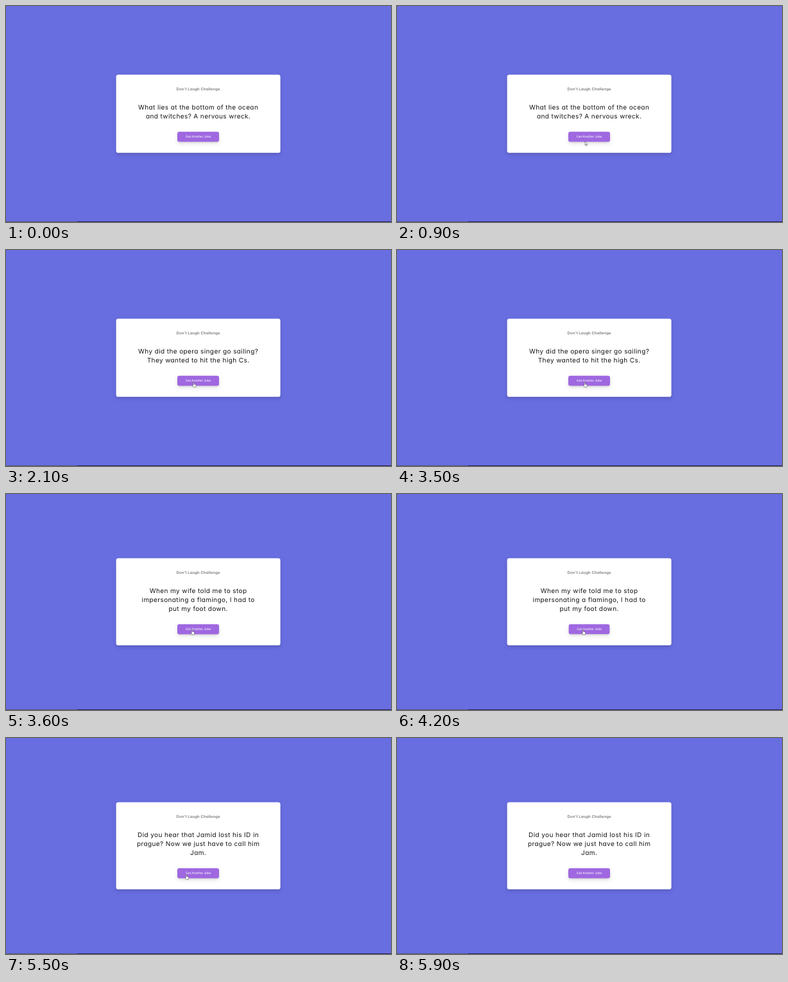
An HTML page for the animation above (6800 ms loop, 600 by 338 pixels).

```html
<!DOCTYPE html>
<html lang="en">
<head>
<meta charset="utf-8">
<title>Don't Laugh Challenge</title>
<style>
  html, body { margin: 0; width: 100%; height: 100%; overflow: hidden; background: #686de0; }
  svg { display: block; width: 600px; height: 338px; }
  text { text-anchor: middle; text-rendering: geometricPrecision; }
  #card { font-family: Inter, "Open Sans", sans-serif; font-feature-settings: "cv11"; }
  .raised { filter: drop-shadow(0 3.2px 3.2px rgba(0,0,0,.1)) drop-shadow(0 1.9px 1px rgba(0,0,0,.1)); }
  #title { font-size: 6px; font-weight: 600; letter-spacing: .08px; fill: #7c7c7c; }
  #joke { font-size: 10px; letter-spacing: .4px; fill: #151515; }
  #btn { transform-box: fill-box; transform-origin: center; }
  #btn text { font: 5.12px "Liberation Sans", Arial, sans-serif; fill: #fff; }
  #cursor path { fill: #fff; stroke: #333; stroke-width: .5; stroke-linejoin: round; }
</style>
</head>
<body>
<svg viewBox="0 0 600 338">
  <path d="M0 337H111V338H0Z" fill="#55586f"/>
  <path d="M111 337H600V338H111Z" fill="#23244a"/>
  <g id="card">
    <rect id="panel" class="raised" width="256" rx="3.4" fill="#fff"/>
    <text id="title" x="128" y="24.3">Don't Laugh Challenge</text>
    <text id="joke"></text>
    <g id="foot">
      <g id="btn">
        <rect class="raised" x="95.4" width="65" height="15.8" rx="3.2" fill="#9f68e0"/>
        <text x="128" y="9.7">Get Another Joke</text>
      </g>
    </g>
  </g>
  <g id="cursor">
    <path id="arrow" d="M0 0V6L1.4 4.8 2.3 6.8 3.2 6.4 2.3 4.5H4.1Z"/>
    <path id="hand" d="M-.7 .4Q0-.5 .7 .4V3L3.2 3.6Q4 3.9 3.8 4.9L3.2 7.8H-.2L-1.9 5.2Q-1.9 4.2-.7 4.9Z"/>
  </g>
</svg>
<script>
const LOOP = 6800, STEP = 100;
const $ = id => document.getElementById(id);
const move = (id, x, y) => $(id).setAttribute('transform', `translate(${x} ${y})`);
const show = (id, on) => $(id).style.display = on ? 'inline' : 'none';

const jokes = [
  [0, 'What lies at the bottom of the ocean\nand twitches? A nervous wreck.'],
  [2100, 'Why did the opera singer go sailing?\nThey wanted to hit the high Cs.'],
  [3600, 'When my wife told me to stop\nimpersonating a flamingo, I had to\nput my foot down.'],
  [5400, 'Did you hear that Jamid lost his ID in\nprague? Now we just have to call him\nJam.']
];
const presses = [[1500, 1700], [3400, 3500], [4200, 4400]];

// time, x, y of the pointer tip
const route = [
  [500, 6, 270], [700, 190, 241], [900, 293, 212], [1100, 293.5, 209.5],
  [1300, 292.5, 207], [3500, 292.5, 207], [3600, 290, 212.3], [4200, 290, 212.3],
  [4600, 292, 212.3], [5400, 292, 212.3], [5600, 270, 215], [5800, 111, 223]
];

const within = (t, [a, b]) => t >= a && t < b;

function pointAt(t) {
  const i = Math.max(1, route.findIndex(p => p[0] >= t));
  const [t0, x0, y0] = route[i - 1], [t1, x1, y1] = route[i];
  const k = (t - t0) / (t1 - t0);
  return [x0 + (x1 - x0) * k, y0 + (y1 - y0) * k];
}

let current;
function setJoke(text) {
  if (text === current) return;
  current = text;
  const lines = text.split('\n');
  const height = 94.4 + 14 * lines.length;
  $('joke').innerHTML = lines
    .map((line, i) => `<tspan x="128" y="${54.7 + 14 * i}">${line}</tspan>`).join('');
  $('panel').setAttribute('height', height);
  move('card', 171.6, 168.6 - height / 2);
  move('foot', 0, height - 33.1);
}

function draw(t) {
  setJoke(jokes.filter(j => j[0] <= t).pop()[1]);
  $('btn').style.transform = presses.some(p => within(t, p)) ? 'scale(.98)' : 'none';

  const shown = within(t, [500, 5900]);
  show('cursor', shown);
  if (!shown) return;
  move('cursor', ...pointAt(t));
  const over = within(t, [1200, 5700]);
  show('hand', over);
  show('arrow', !over);
}

const start = performance.now();
function frame() {
  const t = (performance.now() - start) % LOOP;
  draw(Math.floor(t / STEP) * STEP);
  requestAnimationFrame(frame);
}
frame();
</script>
</body>
</html>
```
